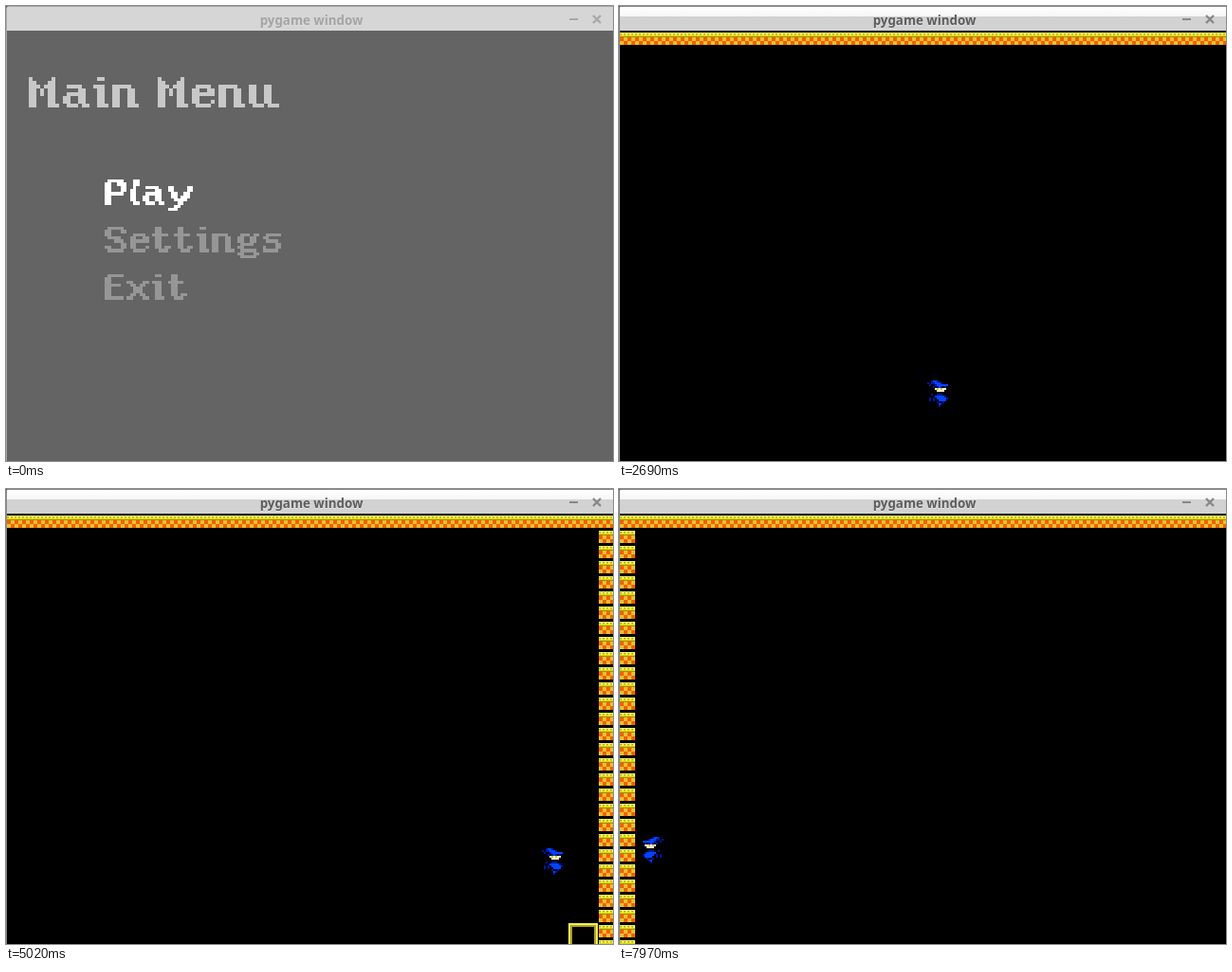
These frames come from a looping animation (640 by 480 pixels, 8 s). An HTML page with a canvas:

```html
<!DOCTYPE html>
<html lang="en">
<head>
<meta charset="utf-8">
<style>
html, body { margin: 0; width: 100%; height: 100%; overflow: hidden; background: #000; }
canvas { display: block; }
</style>
</head>
<body>
<canvas id="stage" width="640" height="480"></canvas>
<script>
const ctx = document.getElementById('stage').getContext('2d');
const LOOP = 8000, TOP = 26, TILE = 16, MAX_SCROLL = 640, CENTER = 336;
const RUN_START = 1610, STEP = 41;

const GLYPHS = {
  M: '#.....#./##...##./###.###./##.#.##./##.#.##./##...##./##...##./##...###',
  P: '.#####./##..###/##...##/##...##/######./##...../##...../##.....',
  S: '.#####./##...##/##...../.####../...###./.....##/##...##/.#####.',
  E: '.#####/##..../##..../#####./##..../##..../##..../######',
  a: '//.####../....##./.#####./##..##./##..##./.###.##',
  e: '//.####./##..##/######/##..../##...#/.####.',
  i: '.##.//###./.##./.##./.##./.##./.###',
  l: '.##/.##/.#./##./##./##./##./.##',
  n: '//#####../##..##./##..##./##..##./##..##./##..###',
  u: '//##..##../##..##../##..##../##..##../##..##../.###.###',
  t: '.##.../.##.../#####./.##.../.##.../.##.../.##.##/..###.',
  g: '//.###.##/##..##./##..##./.####../##...../.#####./##...##/.#####.',
  s: '//.#####/##..../.####./....##/#...##/#####.',
  x: '//##...##/.##.##./..###../..###../.##.##./##...##',
  y: '//##....##/##....##/.##..##./.##.###./..####../...##.../..##..../###.....'
};

const INK = { b: '#0014a8', B: '#0046ff', W: '#fff8c8', Y: '#d8c040' };
// faceRow is the row that lines up across poses.
const POSES = {
  air: { faceRow: 4, rows: [
    '..bBBb.....', 'b.bbBBBb...', '.b..bBBBBBB', '...b.bBb.b.', '....WYWYWW.',
    '.....WWWW..', '...........', '..b..bbb...', '....BBBBBb.', '.b.b.BBBBBb',
    '.b.b..BBBB.', '.....b..b..', '......Bb...', '......b....'] },
  fall: { faceRow: 11, rows: [
    '....b......', '', '....b......', '....B......', '...bBb.....', '...BbB.....',
    '...bBb.....', '..bBbBb....', '..b.BbBb...', '.bBbBbBBBb.', '',
    '..b.WYWYW..', '....WWWW...', '..b........', '..bBBBBB...', '.bBBBBBBB..',
    '.bBBBBBBBb.', '...b.b.....', '.....bB....', '.....bb....', '.....b.....'] },
  ground: { faceRow: 6, rows: [
    '..bBBb.....', '.b...bb....', 'b....Bb....', '....bBBb...', '...BBBBBBBB',
    '...b.....b.', '....WWYWY.W', '......WWWW.', '....b....bb', '....bBBBBb.'] }
};

// [time ms, world x of the wizard's middle]
const PATHS = [
  { from: 1240, to: 5430, jumps: [1580, 2510, 3240, 4530],
    keys: [[1240, 118], [1630, 118], [3677, 1109], [4233, 842], [5080, 1248], [5430, 1248]] },
  { from: 6540, to: 8000, jumps: [6800, 7608],
    keys: [[6540, 118], [6790, 118], [7070, 252], [7330, 127], [7520, 36], [8000, 36]] }
];

function rect(color, x, y, w, h) {
  ctx.fillStyle = color;
  ctx.fillRect(x, y, w, h);
}

function pixelText(text, x, y, unit, color) {
  ctx.fillStyle = color;
  let col = 0;
  for (const ch of text) {
    if (ch === ' ') { col += 4; continue; }
    const rows = GLYPHS[ch].split('/');
    rows.forEach((row, r) => [...row].forEach((dot, c) => {
      if (dot !== '#') return;
      const x0 = Math.round(x + (col + c) * unit), x1 = Math.round(x + (col + c + 1) * unit);
      const y0 = Math.round(y + r * unit), y1 = Math.round(y + (r + 1) * unit);
      ctx.fillRect(x0, y0, x1 - x0, y1 - y0);
    }));
    col += Math.max(...rows.map(row => row.length)) + 1;
  }
}

function drawTitleBar(active) {
  if (active) {
    const shine = ctx.createLinearGradient(0, 0, 0, 11);
    shine.addColorStop(0, '#ffffff');
    shine.addColorStop(1, '#f6f6f6');
    rect(shine, 0, 0, 640, 11);
    rect('#d2d2d2', 0, 11, 640, 15);
  } else {
    rect('#d6d6d6', 0, 0, 640, TOP);
  }
  const edge = active ? '#8a8a8a' : '#a8a8a8';
  rect(edge, 0, 0, 640, 1);
  rect(edge, 0, 0, 1, 480);
  rect('#707070', 0, 0, 2, 1);
  rect('#707070', 0, 1, 1, 1);

  ctx.font = 'bold 13.33px "Noto Sans", "Open Sans", sans-serif';
  ctx.textAlign = 'center';
  ctx.textBaseline = 'alphabetic';
  ctx.fillStyle = active ? '#e8e8e8' : '#dedede';
  ctx.fillText('pygame window', 322, 21);
  ctx.fillStyle = active ? '#5c5c5c' : '#a4a4a4';
  ctx.fillText('pygame window', 322, 20);

  const mark = active ? '#888888' : '#a8a8a8';
  rect(mark, 594, 13, 9, 2);
  ctx.strokeStyle = mark;
  ctx.lineWidth = 2.4;
  ctx.beginPath();
  ctx.moveTo(619, 10); ctx.lineTo(627, 18);
  ctx.moveTo(627, 10); ctx.lineTo(619, 18);
  ctx.stroke();
}

function drawMenu() {
  rect('#646464', 1, TOP, 639, 454);
  pixelText('Main Menu', 24, 75, 4, '#c8c8c8');
  ['Play', 'Settings', 'Exit'].forEach((item, i) =>
    pixelText(item, 104, 183 + 50 * i, 3.33, i ? '#969696' : '#ffffff'));
}

function drawTile(x, y) {
  rect('#f4f070', x, y + 2, 16, 2);
  rect('#dcd800', x, y + 4, 16, 2);
  for (let i = 0; i < 4; i++) {
    rect('#b8a800', x + i * 4, y + 3, 2, 1);
    rect('#f4f070', x + i * 4 + 2, y + 4, 2, 1);
    for (let j = 0; j < 2; j++)
      rect((i + j) % 2 ? '#e8c030' : '#f46000', x + i * 4, y + 7 + j * 4, 4, 4);
  }
  rect('#a88c00', x, y + 6, 16, 1);
}

function drawLevel(scroll) {
  rect('#000000', 1, TOP, 639, 454);
  for (let x = 1 - scroll % TILE; x < 640; x += TILE) drawTile(x, TOP);
  for (let y = TOP + TILE; y < 480; y += TILE) {
    if (scroll < TILE) drawTile(1 - scroll, y);
    if (scroll > MAX_SCROLL - TILE) drawTile(1265 - scroll, y);
  }
  const door = 1233 - scroll;
  if (door < 640) {
    rect('#f0ec60', door, 458, 31, 22);
    rect('#a8a020', door + 2, 460, 27, 20);
    rect('#000000', door + 4, 462, 23, 18);
  }
}

function drawWizard(name, x, height, facing) {
  const { rows, faceRow } = POSES[name];
  const left = Math.round(x) - 11 + (name === 'ground' && facing < 0 ? 2 : 0);
  const top = Math.round(472 - height) - faceRow * 2;
  rows.forEach((row, r) => [...row].forEach((dot, c) => {
    if (INK[dot]) rect(INK[dot], left + (facing > 0 ? c : 10 - c) * 2, top + r * 2, 2, 2);
  }));
}

function walk(keys, t) {
  let facing = 1;
  for (let i = 1; i < keys.length; i++) {
    const [t0, x0] = keys[i - 1], [t1, x1] = keys[i];
    facing = Math.sign(x1 - x0) || facing;
    if (t <= t1) return { x: x0 + (x1 - x0) * (t - t0) / (t1 - t0), facing };
  }
  return { x: keys[keys.length - 1][1], facing };
}

function lift(path, t) {
  const age = (t - path.from) / 1000;
  const drop = 41 - 756 * age * age;
  if (drop > 0) return { height: drop, pose: 'fall' };
  for (const start of path.jumps) {
    const s = (t - start) / 1000;
    const height = 541 * s - 756 * s * s;
    if (s > 0 && height > 0) return { height, pose: 'air' };
  }
  return { height: 0, pose: 'ground' };
}

function drawGame(path, time) {
  const snapped = RUN_START + Math.floor((time - RUN_START + 20) / STEP) * STEP;
  const t = Math.max(path.from, snapped);
  const { x, facing } = walk(path.keys, t);
  const { height, pose } = lift(path, t);
  const scroll = Math.round(Math.min(MAX_SCROLL, Math.max(0, x - CENTER)));
  drawLevel(scroll);
  drawWizard(pose, x - scroll, height, facing);
}

function render(now) {
  const t = now % LOOP;
  const path = PATHS.find(p => t >= p.from && t < p.to);
  if (path) drawGame(path, t); else drawMenu();
  drawTitleBar(t >= 960);
}

const began = performance.now();
function tick() {
  render(performance.now() - began);
  requestAnimationFrame(tick);
}
tick();
</script>
</body>
</html>
```
